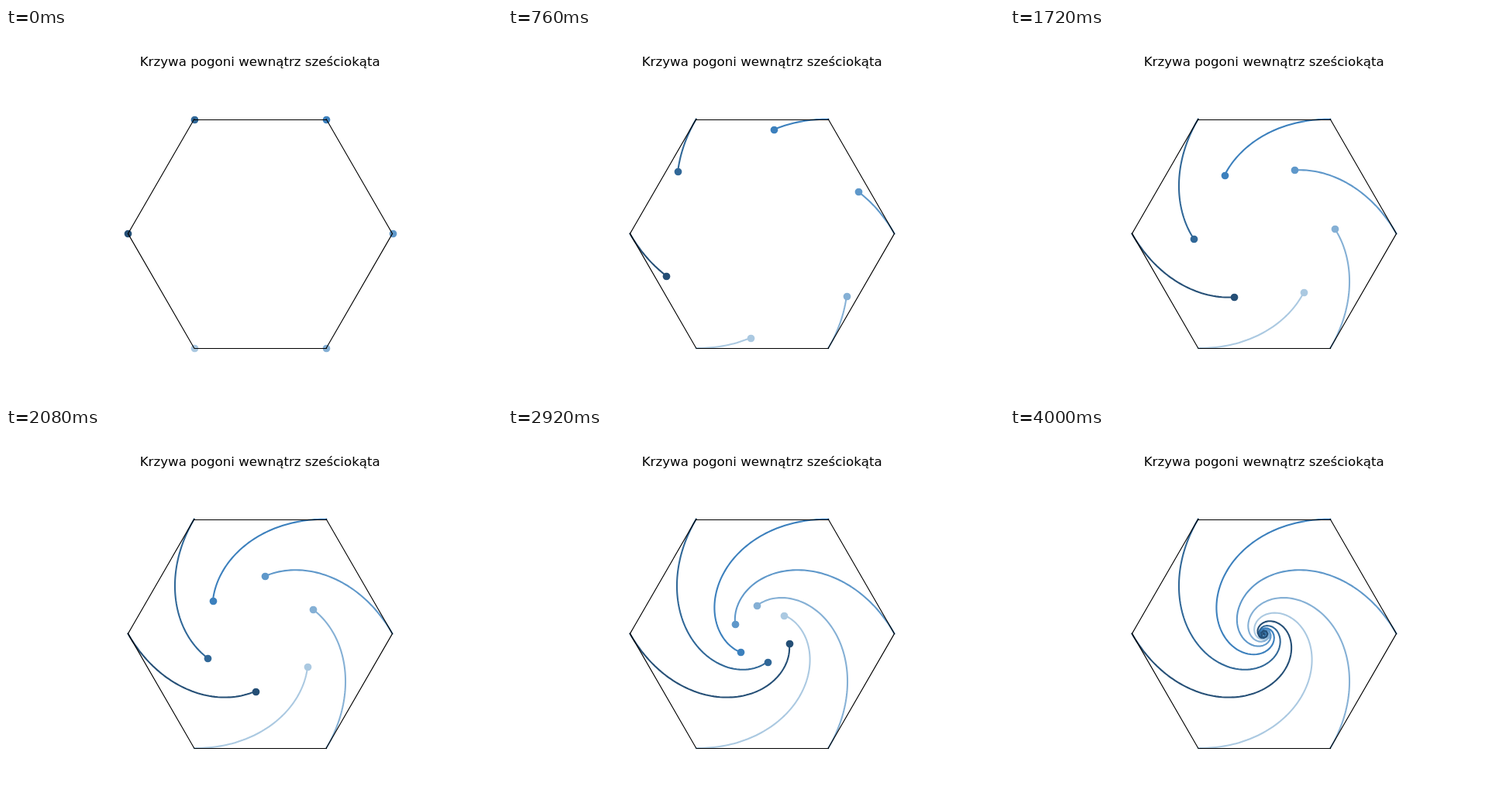
These frames come from a looping animation (640 px wide and 480 px high, 4.04 s). An HTML page:

```html
<!DOCTYPE html>
<html lang="pl">
<head>
<meta charset="utf-8">
<title>Krzywa pogoni</title>
<style>
  html, body { margin: 0; width: 100%; height: 100%; overflow: hidden; background: #fff; }
  svg { display: block; }
  text { font: 16.667px "DejaVu Sans", sans-serif; text-anchor: middle; }
  polyline { fill: none; stroke-width: 2.08; stroke-linecap: square; stroke-linejoin: round; }
  path { fill: none; stroke: #000; stroke-width: 1.11; stroke-linecap: square; }
</style>
</head>
<body>
<svg width="640" height="480" viewBox="0 0 640 480">
  <text x="327.7" y="49">Krzywa pogoni wewnątrz sześciokąta</text>
  <g id="dots"></g>
  <g id="trails"></g>
  <path id="hexagon"/>
</svg>
<script>
const CX = 328, CY = 265.4, RADIUS = 170.55, STEP = 3.786;
const FRAME_MS = 40, FRAMES = 101;
const COLORS = ['#abc9e1', '#85b0d5', '#5f98ca', '#3c80bd', '#316898', '#254f76'];

const byId = id => document.getElementById(id);

function add(parent, tag, attrs) {
  const el = document.createElementNS('http://www.w3.org/2000/svg', tag);
  for (const key in attrs) el.setAttribute(key, attrs[key]);
  return parent.appendChild(el);
}

// Counterclockwise from the lower left corner.
const corners = COLORS.map((_, i) => {
  const angle = (i - 2) * Math.PI / 3;
  return [CX + RADIUS * Math.cos(angle), CY - RADIUS * Math.sin(angle)];
});

// Every pursuer takes a fixed-length step towards its neighbour.
function pursue(points) {
  return points.map(([x, y], i) => {
    const [tx, ty] = points[(i + 1) % points.length];
    const k = STEP / Math.hypot(tx - x, ty - y);
    return [x + (tx - x) * k, y + (ty - y) * k];
  });
}

const states = [corners];
while (states.length < FRAMES) states.push(pursue(states[states.length - 1]));

const snap = v => Math.round(v) + 0.5;

// Horizontal edges sit on whole pixel rows, slanted ones do not.
byId('hexagon').setAttribute('d', corners.map(([x1, y1], i) => {
  const [x2, y2] = corners[(i + 1) % corners.length];
  const flat = Math.abs(y1 - y2) < 1;
  const [ax, ay, bx, by] = flat ? [x1, y1, x2, y2].map(snap) : [x1, y1, x2, y2];
  return `M${ax} ${ay}L${bx} ${by}`;
}).join(''));

const dots = COLORS.map(fill => add(byId('dots'), 'circle', { r: 4.86, fill }));
const trails = COLORS.map(stroke => add(byId('trails'), 'polyline', { stroke }));

let shown = -1;

function show(frame) {
  if (frame === shown) return;
  shown = frame;
  const path = states.slice(0, frame + 1);
  COLORS.forEach((_, i) => {
    const [x, y] = states[frame][i];
    dots[i].setAttribute('cx', snap(x));
    dots[i].setAttribute('cy', snap(y));
    trails[i].setAttribute('points', frame ? path.map(s => s[i].join()).join(' ') : '');
  });
}

const start = performance.now();

function tick() {
  show(Math.floor((performance.now() - start) / FRAME_MS) % FRAMES);
  requestAnimationFrame(tick);
}
tick();
</script>
</body>
</html>
```
